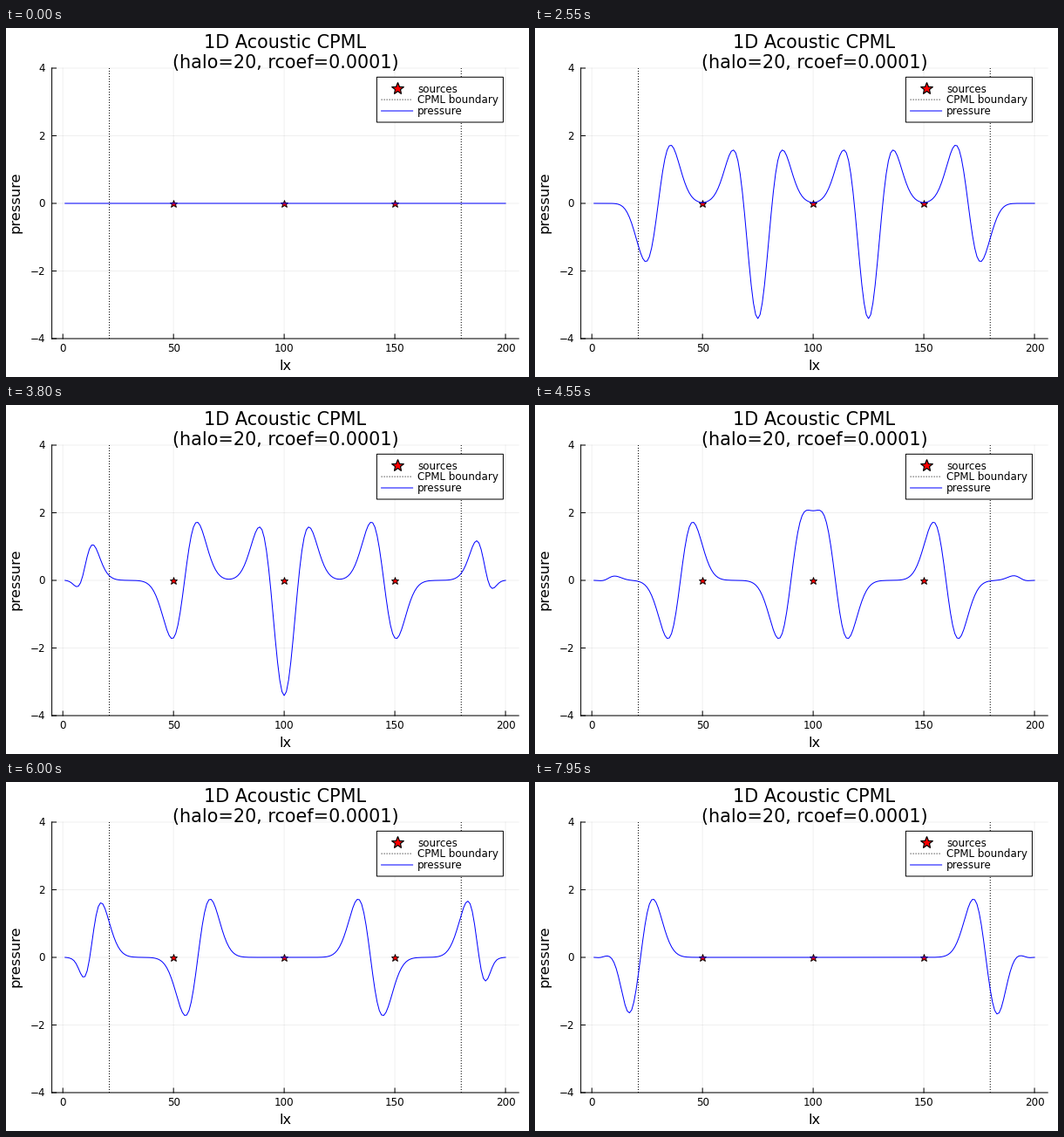
Recreate the animation shown at these times as a matplotlib script. Size 600 px wide and 400 px high, loop 8000 ms.

```python
import numpy as np
import matplotlib.pyplot as plt
from matplotlib.animation import FuncAnimation
from matplotlib.patches import Rectangle

W, H, DPI = 600, 400, 100
PX = 72 / DPI                       # one pixel in points
LEFT, RIGHT, TOP, BOTTOM = 52.6, 588.2, 46, 356
NX, HALO, RCOEF = 200, 20, 1e-4
SOURCES = (50, 100, 150)
WAVELENGTH = 25                     # grid cells per dominant period
DELAY = 1.2 * WAVELENGTH
FRAMES, INTERVAL = 160, 50

plt.rcParams["font.family"] = "DejaVu Sans"


def sx(x):
    pad = 0.03 * (NX - 1)
    return LEFT + (x - 1 + pad) / (NX - 1 + 2 * pad) * (RIGHT - LEFT)


def sy(p):
    return (TOP + BOTTOM) / 2 - p * (BOTTOM - TOP) / 8


def ricker(t):
    q = (np.pi * (t - DELAY) / WAVELENGTH) ** 2
    return (1 - 2 * q) * np.exp(-q)


def damping(x):
    """Absorbing layer coefficients at grid positions x."""
    depth = np.maximum(0, np.maximum(HALO + 2 - x, x - (NX - HALO - 1))) / HALO
    d = -3 * np.log(RCOEF) / (2 * HALO) * depth ** 2
    alpha = np.pi / WAVELENGTH * np.maximum(0, 1 - depth)
    b = np.exp(-(d + alpha))
    return d * (b - 1) / (d + alpha), b


def simulate(steps):
    """Second-order 1D wave equation with unit Courant number."""
    x = np.arange(1, NX + 1)
    a, b = damping(x[1:-1])
    ah, bh = damping(x[:-1] + 0.5)
    old, cur = np.zeros(NX), np.zeros(NX)
    psi, xi = np.zeros(NX - 1), np.zeros(NX - 2)
    src = np.array(SOURCES) - 1
    states = [cur]
    for n in range(steps):
        grad = np.diff(cur)
        psi = bh * psi + ah * grad
        lap, dpsi = np.diff(grad), np.diff(psi)
        xi = b * xi + a * (lap + dpsi)
        new = np.zeros(NX)
        new[1:-1] = 2 * cur[1:-1] - old[1:-1] + lap + dpsi + xi
        new[src] += ricker(n)
        old, cur = cur, new
        states.append(cur)
    return states


fig = plt.figure(figsize=(W / DPI, H / DPI), dpi=DPI, facecolor="white")
ax = fig.add_axes([0, 0, 1, 1])
ax.set_xlim(0, W)
ax.set_ylim(H, 0)
ax.axis("off")


def line(xs, ys, color="black", z=1, **kw):
    return ax.plot(xs, ys, color=color, lw=PX, zorder=z, snap=False, **kw)[0]


def text(x, y, s, size, ha="center", **kw):
    ax.text(x, y, s, fontsize=size * PX, ha=ha, va="baseline", zorder=8, **kw)


def star(x, y, radius, edge, z):
    line([x], [y], z=z, marker="*", ms=2 * radius * PX, mfc="red",
         mec="black", mew=edge * PX)


def dotted(xs, ys, z):
    line(xs, ys, z=z, ls=(0, (1, 2)))


# axes, grid and tick labels
line([LEFT, LEFT], [TOP, BOTTOM], z=3)
line([LEFT, RIGHT], [BOTTOM, BOTTOM], z=3)
for v in range(0, 201, 50):
    x = sx(v)
    line([x, x], [TOP, BOTTOM], alpha=0.06)
    line([x, x], [BOTTOM, BOTTOM - 5], z=3)
    text(x, 371.3, str(v), 11.86)
for v in range(-4, 5, 2):
    y = sy(v)
    line([LEFT, RIGHT], [y, y], alpha=0.06)
    line([LEFT, LEFT + 5], [y, y], z=3)
    text(44.9, y + 4.3, str(v).replace("-", "\u2212"), 11.86, "right")

mid = (LEFT + RIGHT) / 2
text(mid - 0.8, 22.8, "1D Acoustic CPML", 20.75)
text(mid, 46, "(halo=20, rcoef=0.0001)", 20.75)
text(mid, 392, "lx", 16.3)
text(15.3, sy(0) - 1.1, "pressure", 16.3, rotation=90, rotation_mode="anchor")

# sources, layer limits and the wave
for s in SOURCES:
    star(sx(s), sy(0), 4.5, 0.9, 4)
for v in (HALO + 1, NX - HALO):
    dotted([sx(v)] * 2, [BOTTOM, TOP], 4)
grid_x = sx(np.arange(1, NX + 1))
wave = line(grid_x, np.full(NX, sy(0)), "blue", z=5,
            solid_joinstyle="miter")

# legend
ax.add_patch(Rectangle((425.4, 56.3), 145, 51.7, fc="white", ec="black",
                       lw=PX, zorder=6, snap=False))
star(449, 69.2, 7, 1.2, 7)
dotted([430.6, 466.6], [82.1, 82.1], 7)
line([430.6, 466.6], [95, 95], "blue", z=7)
for i, s in enumerate(("sources", "CPML boundary", "pressure")):
    text(472, 73.5 + 12.7 * i, s, 11.86, "left")

states = simulate(FRAMES)


def draw(k):
    wave.set_ydata(sy(states[max(k - 1, 0)]))
    return [wave]


anim = FuncAnimation(fig, draw, frames=FRAMES, interval=INTERVAL,
                     repeat=True, repeat_delay=0, blit=False)
plt.show()
```
